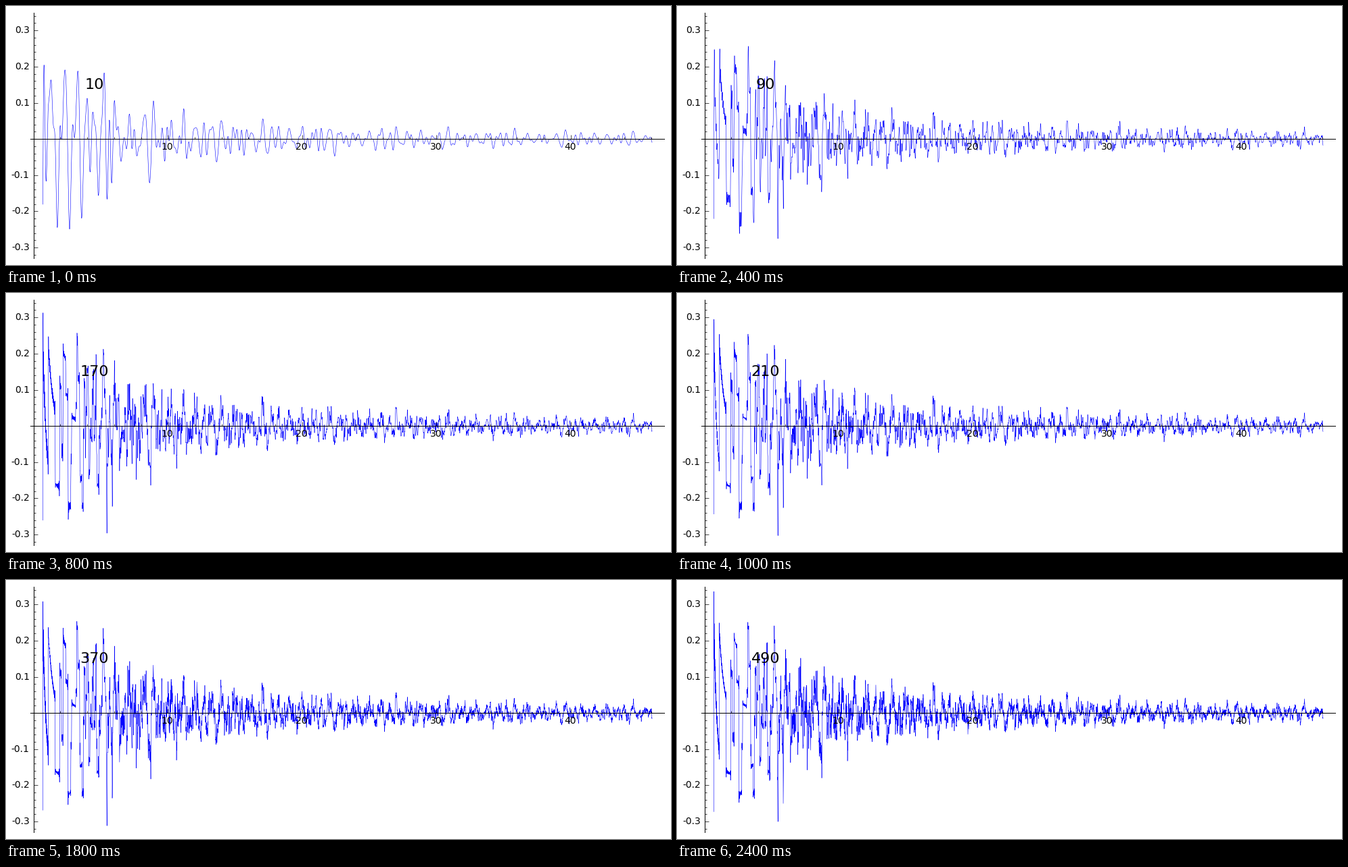
Animation of 983 by 384 pixels, one loop 2.6 s. Source, as a matplotlib script:

```python
import numpy as np
import matplotlib.pyplot as plt
from matplotlib.animation import FuncAnimation
from matplotlib.ticker import MultipleLocator
from matplotlib.transforms import ScaledTranslation

W, H, DPI = 983, 384, 100
COUNTS = range(10, 491, 40)
CONDUCTOR = 11


def newform_coefficients(size):
    """a_1..a_size of q * prod (1 - q^n)^2 (1 - q^11n)^2."""
    c = np.zeros(size)
    c[0] = 1
    for n in range(1, size):
        for m in (n, n, CONDUCTOR * n, CONDUCTOR * n):
            if m < size:
                c[m:] -= c[:-m].copy()
    return c


def l_function_zeros(tilt=0.04, step=1 / 128, size=2**16):
    """Heights of the critical zeros, from a Mellin integral on a rotated ray."""
    a = newform_coefficients(600)
    n = np.arange(1, len(a) + 1)
    v = np.arange(0, 7, step)
    y = np.exp(v + 1j * (np.pi / 2 - tilt))
    g = y * (np.exp(-2 * np.pi / np.sqrt(CONDUCTOR) * np.outer(y, n)) @ a)
    g[0] /= 2
    z = np.fft.ifft(g, size).real[:size // 2] * size
    i = np.flatnonzero(z[:-1] * z[1:] < 0)
    dt = 2 * np.pi / (size * step)
    return dt * (i + z[i] / (z[i] - z[i + 1]))


# Partial sums of 2/u * sum sin(gamma u) / gamma, with u = log X
gamma = l_function_zeros()[:COUNTS[-1]]
u = np.linspace(np.log(2), 20 * np.log(10), 10000)
waves = np.sin(np.outer(u, gamma)) / gamma
curves = 2 * np.cumsum(waves, axis=1)[:, COUNTS[0] - 1::COUNTS.step] / u[:, None]

plt.rcParams["font.family"] = "DejaVu Sans"
fig = plt.figure(figsize=((W + .01) / DPI, (H + .01) / DPI), dpi=DPI, facecolor="white")

left, right, top, bottom = 36.45, 973, 10, 374
ax = fig.add_axes([left / W, 1 - bottom / H, (right - left) / W, (bottom - top) / H])
ax.set_xlim(-0.214, 46.96)
ax.set_ylim(-0.3296, 0.3489)
ax.set_axisbelow(False)
ax.patch.set_visible(False)

for side in ("top", "right"):
    ax.spines[side].set_visible(False)
for side in ("left", "bottom"):
    ax.spines[side].set_position(("data", 0))
    ax.spines[side].set_linewidth(0.72)

y_ticks = [k / 10 for k in range(-3, 4) if k]
ax.set_xticks(range(10, 50, 10))
ax.set_yticks(y_ticks, [f"{y:.1f}" for y in y_ticks], va="center")
ax.xaxis.set_minor_locator(MultipleLocator(2))
ax.yaxis.set_minor_locator(MultipleLocator(0.02))
ax.tick_params(which="both", direction="in", width=0.5, labelsize=10)
ax.tick_params(which="major", length=4)
ax.tick_params(which="minor", length=2)
ax.tick_params(axis="x", pad=3.3)
ax.tick_params(axis="y", pad=4.3)
nudge = ScaledTranslation(-1 / DPI, 0, fig.dpi_scale_trans)
for tick_label in ax.get_xticklabels():
    tick_label.set_transform(tick_label.get_transform() + nudge)

line, = ax.plot([], [], color="blue", lw=0.4)
label = ax.text(4.54, 0.15, "", fontsize=16, ha="center", va="center", zorder=3)


def update(frame):
    line.set_data(u, curves[:, frame])
    label.set_text(str(COUNTS[frame]))
    return line, label


anim = FuncAnimation(fig, update, frames=len(COUNTS), interval=200,
                     repeat=True, repeat_delay=0)
plt.show()
```
